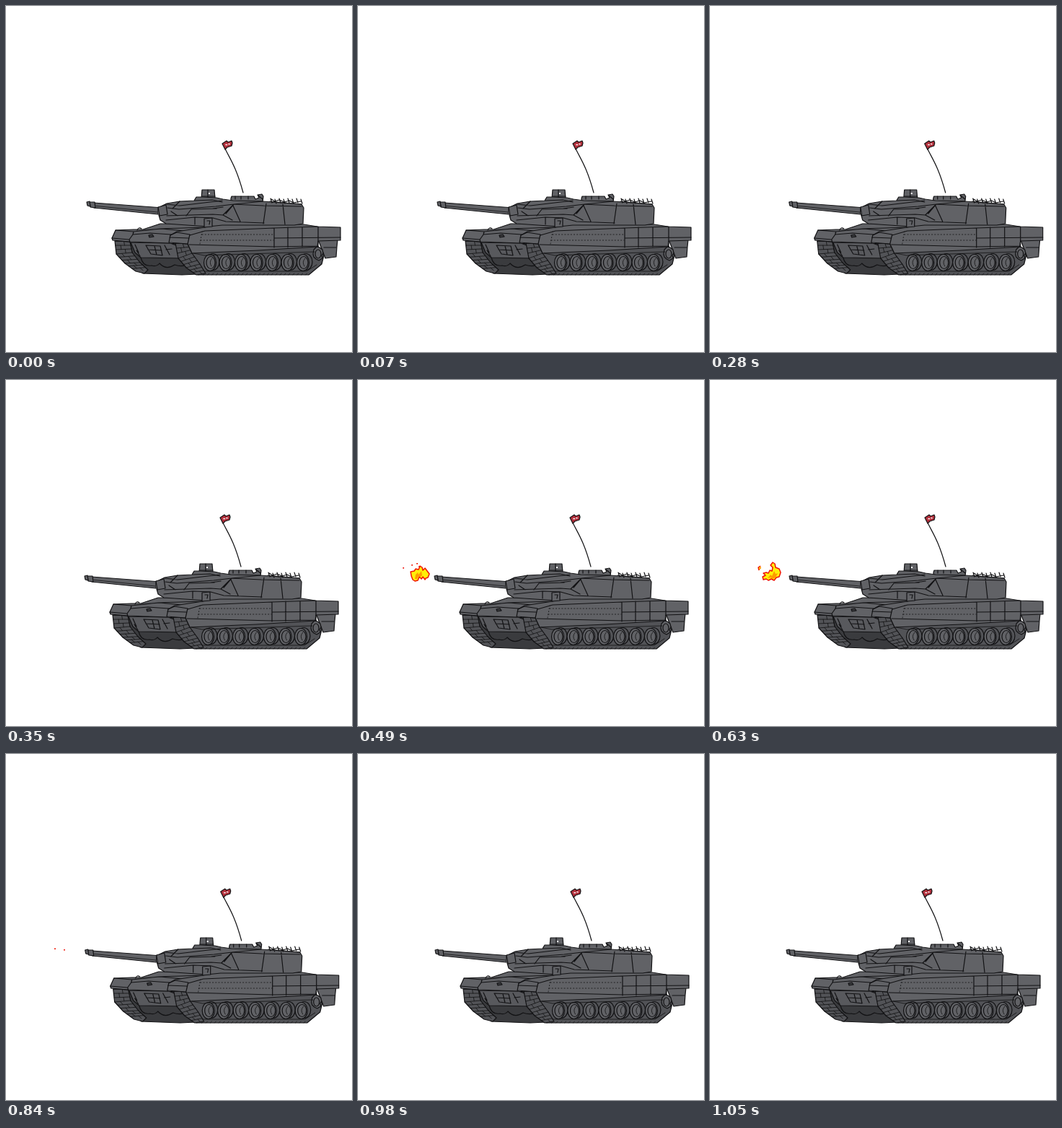
Recreate the animation shown at these times as an HTML page. Size 480 px wide and 480 px high, loop 1.12 s.

```html
<!DOCTYPE html>
<html>
<head>
<meta charset="utf-8">
<style>
html, body { margin: 0; width: 100%; height: 100%; overflow: hidden; background: #fff; }
svg { display: block; width: 100vw; height: 100vh; }
#tank { fill: #616266; stroke: #121214; stroke-width: 1.2; stroke-linejoin: round; stroke-linecap: round; }
.line { fill: none; }
.thin { fill: none; stroke-width: .8; }
.front { fill: #58595d; }
.track { fill: #525357; }
.dark { fill: #3a3b3e; }
#fire { stroke: #f01400; stroke-width: 1.5; stroke-linejoin: round; fill: #ffee08; }
#fire .lick { fill: #ff9a00; stroke: none; }
#fire .speck { fill: #f01400; stroke: none; }
</style>
</head>
<body>
<svg viewBox="0 0 480 480">
  <g id="tank">
    <!-- antenna and pennant -->
    <path class="line" d="M304 198C310 211 319 222 329 259"/>
    <path fill="#b3303c" d="M300 191L306 187 308 189 313 187 314 190 313 194 307 196 304 199Z"/>
    <path d="M305 192.500h1.500M309 191.500h1" stroke="#fff" stroke-width="1.5"/>

    <!-- left track and lower hull -->
    <path class="dark" d="M172 328L252 330 266 372 244 373 190 371 178 357Z"/>
    <path class="track" d="M151 326L172 327 175 342 186 356 197 366 192 371 180 368 165 357 153 344Z"/>
    <g id="leftTread" class="thin"></g>
    <path class="front" d="M173 328L228 329 236 332 246 350 187 349 179 342Z"/>
    <path class="line" d="M187 349Q190 362 202 360Q209 362 213 357Q222 367 234 359Q246 363 254 357"/>

    <!-- front plates -->
    <path d="M147 322L152 311 177 310 190 310 214 302 290 302 276 311 237 315 228 318 227 329 172 327 148 325Z"/>
    <path class="line" d="M147 322L171 324 176 317 200 315 229 317M152 311L177 313 214 309 276 307M171 324L172 328M176 317L177 313M192 311L216 309 247 312M182 311Q184 306 188 309"/>
    <path class="dark" d="M198 318l5-1 2 3-6 1Z"/>
    <path class="line" d="M194 332L214 333 217 346 201 344ZM197 338L216 339M206 333L209 345M179 331L184 342M220 332L227 345M181 339l5 8M222 338l8-1"/>

    <!-- running gear -->
    <path class="track" d="M255 337L432 332 441 346 438 358 420 373 266 373 249 354Z"/>
    <path class="thin" d="M271 368L417 368 431 359"/>
    <g id="links" class="thin"></g>
    <g id="wheels"></g>
    <path d="M433 324L460 324 459 334 458 348 443 350Z"/>
    <path class="line" d="M441 335H458"/>
    <path d="M427 338l4-4 4 1 4 3 1 5-2 3 1 4-5 3-4-2-3-3-1-4Z"/>
    <ellipse class="line" cx="433" cy="344" rx="4" ry="6"/>

    <!-- right track front -->
    <path class="track" d="M235 329L252 330 258 343 269 358 277 371 264 373 250 363 239 350Z"/>
    <g id="rightTread" class="thin"></g>

    <!-- side skirts -->
    <path d="M226 328L228 318 237 313 276 307 290 303 413 303 432 306 464 307 464 325 433 326 432 334 350 339 258 343 252 330Z"/>
    <path class="line" d="M228 318L237 314 255 317 252 330M227 321L253 322M254 331L372 334 433 333M255 318L276 312 372 308 432 306M372 308V335M391 307V335M411 307V334M433 306V334M372 322L464 321"/>
    <path class="thin" d="M269 330L272 313M272 317H371M270 325H371" stroke-dasharray="1.2 3"/>
    <path class="thin" d="M260 343L275 346 428 341"/>

    <!-- turret -->
    <path d="M272 255L289 255 290 267 271 267Z"/>
    <path class="line" d="M280 255V266M272 264H290"/>
    <path d="M281 259h2v2h-2Z" fill="#fff" stroke="none"/>
    <path d="M312 267L313 264 344 264 346 268 351 266 349 262 355 261 357 264 356 272 312 274Z"/>
    <path class="line" d="M318 264v4M326 264v4M336 264v4M350 263l6 5"/>
    <path d="M215 278L223 274 241 271 261 270 264 265 273 265 292 266 301 268 315 270 356 271 410 275 413 280 412 302 400 304 300 304 281 306 222 302 214 297 212 290Z"/>
    <path class="line" d="M223 275L241 277 300 270M224 280L240 282 291 278 316 275 356 271M223 291L287 289 301 290 315 276M222 297L262 293 287 294 305 299 358 301M241 271L231 281M250 291L257 282 292 281M301 290L314 297M305 288L316 275 357 277M361 274L357 302M384 275L387 303M356 277L410 278M262 270L286 269 300 272M287 281L301 279M229 285l9 6M262 293v10M315 277l10 22"/>
    <path d="M275 295L286 294 286 306 275 307Z"/>
    <path class="line" d="M279 298l4 0-1 5"/>
    <path d="M211 279L222 276 224 289 213 291Z"/>
    <g id="rack" class="line"></g>

    <!-- gun -->
    <path d="M122 273L211 279.5 211 289 122 280Z"/>
    <path class="thin" d="M125 277.500L210 286"/>
    <path d="M116 272L123 272 124 280 117 279Z"/>
    <path d="M112 272l4-1 1 7-4-1Z"/>
  </g>
  <g id="fire"></g>
</svg>
<script>
const $ = id => document.getElementById(id);
const range = (n, f) => Array.from({ length: n }, (_, i) => f(i)).join('');
const path = (d, cls = '') => `<path class="${cls}" d="${d}"/>`;

// Point at fraction u along a list of points.
function along(points, u) {
  const p = u * (points.length - 1), i = Math.min(points.length - 2, Math.floor(p));
  return [0, 1].map(k => points[i][k] + (points[i + 1][k] - points[i][k]) * (p - i));
}

// Track links: rungs between two edges, with staggered centre joints.
function tread(left, right, n) {
  return path(range(n, i => {
    const a = along(left, i / n), b = along(right, i / n);
    const c = along(left, (i + 1) / n), d = along(right, (i + 1) / n);
    const s = i % 2 ? .35 : .6;
    const mid = (p, q) => [p[0] + (q[0] - p[0]) * s, p[1] + (q[1] - p[1]) * s];
    return `M${a}L${b}M${mid(a, b)}L${mid(c, d)}`;
  }));
}

$('leftTread').innerHTML = tread(
  [[151, 326], [153, 344], [165, 357], [180, 368]],
  [[172, 327], [175, 342], [186, 356], [197, 366]], 9);
$('rightTread').innerHTML = tread(
  [[235, 329], [239, 350], [250, 363], [264, 373]],
  [[252, 330], [258, 343], [269, 358], [277, 371]], 9);
$('links').innerHTML = path(range(26, i => `M${270 + i * 5.9} 371l-2 2`));

const ellipse = (x, y, rx, ry, cls = '') =>
  `<ellipse class="${cls}" cx="${x}" cy="${y}" rx="${rx}" ry="${ry}"/>`;
$('wheels').innerHTML = range(7, i => {
  const x = 284 + i * 21.5;
  return ellipse(x + 3, 355, 9, 11.5, 'track') + ellipse(x - 1, 356, 8.5, 11.5) +
    ellipse(x, 356, 6, 8.5) + path(`M${x + 2} 350q-5 5-1 11`, 'thin');
});
$('rack').innerHTML = path('M366 271L410 275M368 268l5 3 6-2 7 3 7-2 6 3 10-2' +
  range(8, i => `M${367 + i * 6} ${267 + i % 2}l2 6`));

const specks = (...points) => path(points.map(p => `M${p}h2v1.500h-2Z`).join(''), 'speck');
const ball = path('M73 266l5-1 2-3 4 1 2-5 3 2 1 4 3-3 3 4 3 4-2 5-3 1-1 2-3-4-2 3-3-3-2 5-4 1-3-2-2-5Z') +
  path('M79 276l1-6 3-3 1 3 4-5 1 6-2 2-3-1-2 4Z', 'lick');
const torn = path('M74 268l4-1 3 1 2-4 3 1 1-5-3-3 3-4 3 2 1 5 5 2 2 5-2 6-4 1-3 4-4-2-4 2-3-2-4 1-1-4 4-2Z') +
  path('M80 275l4-5 2 2 3-7 2 4 3-1-3 6-4 2-3-2Z', 'lick') +
  path('M68 264l-1-4 3-2 1 3Z', 'lick') + path('M68 264l-1-4 3-2');
const about = (shape, s) => `<g transform="translate(${86 * (1 - s)} ${269 * (1 - s)}) scale(${s})">${shape}</g>`;
const fires = {
  6: about(ball, .65),
  7: ball + specks([62, 260], [74, 256], [81, 254], [84, 258]),
  8: ball + specks([64, 260], [73, 257], [87, 253]),
  9: torn,
  10: about(torn, .85),
  11: about(torn, .4) + specks([68, 266]),
  12: specks([67, 269.5], [80, 271])
};

const sway = [0, -2, -3, -3, -2.3, -3, -5, -6];
let shown = -1;
function draw(now) {
  const step = Math.floor(now % 1120 / 70);
  if (step !== shown) {
    shown = step;
    $('tank').setAttribute('transform', `translate(${sway[step % 8]} 0)`);
    $('fire').innerHTML = fires[step] || '';
  }
  requestAnimationFrame(() => draw(performance.now()));
}
draw(performance.now());
</script>
</body>
</html>
```
